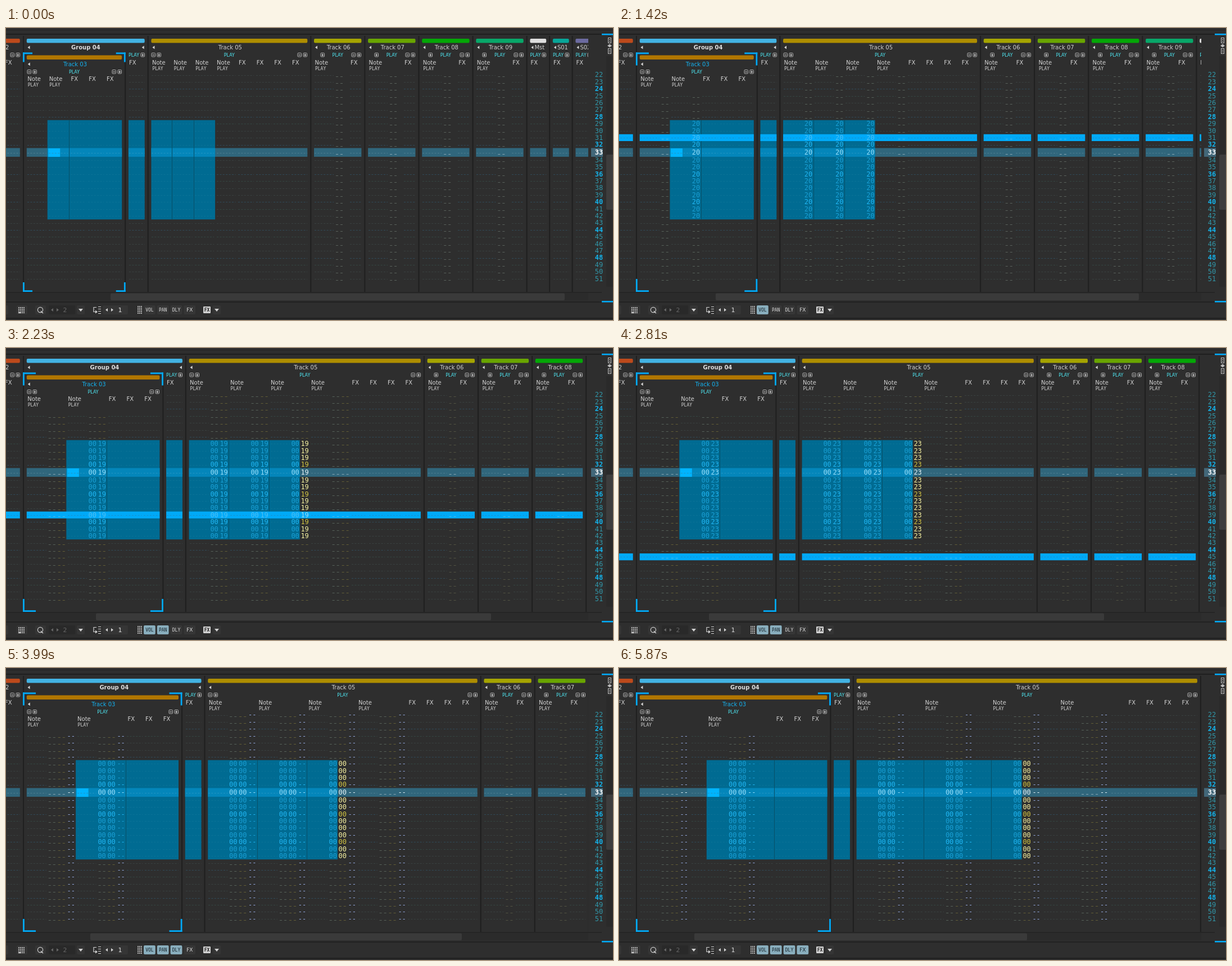
Write an HTML page with a canvas that moves like this. It is 1080x519 px and loops after 6.11 s.

```html
<!DOCTYPE html>
<html lang="en">
<head>
<meta charset="utf-8">
<title>Pattern editor</title>
<style>
html, body { margin: 0; width: 100%; height: 100%; overflow: hidden; background: #2e2e2e; }
canvas { display: block; width: 100vw; height: 100vh; }
</style>
</head>
<body>
<canvas id="stage" width="1080" height="519"></canvas>
<script>
const ctx = document.getElementById('stage').getContext('2d');
const LOOP = 6110, CLIP = 1036, FIRST = 22, LAST = 51, CURSOR = 33;
const SANS = '"DejaVu Sans", sans-serif', MONO = '"DejaVu Sans Mono", monospace';
const BG = '#2e2e2e', DARK = '#1f1f1f', LIGHT = '#d2d2d2', BLUE = '#00aaf8', CYAN = '#4ee6f2';
const NOTE_WIDTHS = [38.4, 55.2, 72, 88.8, 120.5];
const THUMBS = [[186, 994], [172, 925], [160, 863], [150, 811], [134, 726]];
const FX_WIDTH = 31.67, GAP = 11.7;
const SEL_TOP = 163.7, SEL_HEIGHT = 176.6, BAR_TOP = 213.4, BAR_HEIGHT = 15.5;
const SUB_OFFSETS = [45, 62, 79];
const SUB_COLORS = ['#566159', '#625d36', '#93a9de'];

function rect(x, y, w, h, color) {
  ctx.fillStyle = color;
  ctx.fillRect(x, y, w, h);
}
function rounded(x, y, w, h, color, r = 2) {
  ctx.fillStyle = color;
  ctx.beginPath();
  ctx.roundRect(x, y, w, h, r);
  ctx.fill();
}
function text(s, x, y, color = LIGHT, size = 10, family = SANS, align = 'left', weight = '') {
  ctx.font = `${weight} ${size}px ${family}`;
  ctx.textAlign = align;
  ctx.fillStyle = color;
  ctx.fillText(s, x, y + size * .365);
}
function triangle(x, y, dir, color = LIGHT) {
  const points = dir === 'down' ? [[-4, -2], [4, -2], [0, 3]]
    : dir === 'left' ? [[2, -3], [2, 3], [-2, 0]] : [[-2, -3], [-2, 3], [2, 0]];
  ctx.fillStyle = color;
  ctx.beginPath();
  for (const [dx, dy] of points) ctx.lineTo(x + dx, y + dy);
  ctx.fill();
}
function signBox(cx, cy, sign) {
  const x = Math.round(cx), y = Math.round(cy);
  ctx.strokeStyle = '#b4b4b4';
  ctx.lineWidth = 1;
  ctx.beginPath();
  ctx.roundRect(x - 3, y - 3.5, 6.5, 6.5, 1);
  ctx.stroke();
  rect(x - 1.5, y - .5, 3.5, 1, '#eee');
  if (sign === '+') rect(x - .3, y - 2, 1, 4, '#eee');
}
function signPair(x, y) { signBox(x, y, '-'); signBox(x + 10, y, '+'); }
function dashes(x1, x2, y, color) {
  const line = Math.floor(y + 1) + .5;
  ctx.strokeStyle = color;
  ctx.lineWidth = 1;
  ctx.setLineDash([3, 2.4]);
  ctx.beginPath();
  ctx.moveTo(Math.round(x1), line);
  ctx.lineTo(x2, line);
  ctx.stroke();
  ctx.setLineDash([]);
}
function emptyValue(cx, y, color) {
  const line = Math.floor(y + 3);
  rect(cx - 6, line, 4, 1, color);
  rect(cx + 2, line, 4, 1, color);
}

const rowY = r => r < CURSOR ? 83 + 12.4 * (r - FIRST) : r === CURSOR ? 221 : 234.5 + 12.4 * (r - 34);
const hex = v => v.toString(16).toUpperCase().padStart(2, '0');
const arch = (p, peak, power) => p <= 0 || p >= 1 ? 0 : Math.round(peak * Math.sin(Math.PI * p) ** power);

// The screen refreshes in steps of about 117 ms while the song plays.
function sceneAt(time) {
  const k = time < 480 ? -1 : Math.floor((time - 465) / 117.2);
  const mode = k < 0 ? 0 : k < 12 ? 1 : k < 24 ? 2 : k < 34 ? 3 : 4;
  const delay = arch((k - 24.5) / 5.5, 40, 1);
  return {
    mode,
    playRow: 25 + Math.floor((k - 3) * 20 / 17 + .25),
    values: [
      k < 2 ? '--' : hex(arch((k - 1.45) / 10, 41, 2)),
      k < 13 ? '--' : hex(arch((k - 12.66) / 11, 40.4, 1)),
      delay ? hex(delay) : '--'
    ]
  };
}

function layout(mode) {
  const w = NOTE_WIDTHS[mode];
  const multi = (notes, fx) => notes * w + fx * FX_WIDTH - 2.4;
  const specs = [
    ['multi', 'Track 03', '#b17600', multi(2, 3), 2, 3],
    ['slim', '', '', 28.8, 0, 1],
    ['multi', 'Track 05', '#ae8d00', multi(4, 4), 4, 4],
    ['single', 'Track 06', '#a5a400', 84.4, 1, 1],
    ['single', 'Track 07', '#69a500', 84.4, 1, 1],
    ['single', 'Track 08', '#04a706', 84.4, 1, 1],
    ['single', 'Track 09', '#08a769', 84.4, 1, 1],
    ['slim', 'Mst', '#dedede', 28.8, 0, 1],
    ['slim', 'S01', '#08a699', 28.8, 0, 1],
    ['slim', 'S02', '#6c6ba0', 28.8, 0, 1]
  ];
  let x = 36.8;
  return specs.map(([kind, title, color, width, notes, fx], i) => {
    const fxStart = kind === 'single' ? (mode ? 56 : 63) : notes * w;
    const track = { kind, title, color, x, width, notes, fx, w, fxStart, end: x + width, inner: i === 0 };
    x += width + GAP;
    return track;
  });
}

function drawHeader(t) {
  const dy = t.inner ? 29.7 : 0, mid = t.x + t.width / 2;
  if (t.color) {
    rounded(t.x, 18.9 + dy, t.width, 7.5, t.color);
    triangle(t.x + 4, 34.5 + dy, 'left');
    if (t.kind === 'slim') text(t.title, t.x + 8, 34.5);
    else text(t.title, mid + 1.5, 34.5 + dy, t.inner ? '#13b2f2' : LIGHT, 10, SANS, 'center');
  }
  const iconY = 48 + dy;
  if (t.kind === 'slim') {
    text('PLAY', t.x, iconY, CYAN, 8, SANS);
    signBox(t.x + 25, iconY, '+');
    text('FX', t.x + 1, 61);
    return;
  }
  text('PLAY', mid, iconY, CYAN, 8, SANS, 'center');
  if (t.kind === 'multi') signPair(t.x + 4, iconY);
  else signBox(t.x + 15, iconY, '+');
  signPair(t.end - 14, iconY);
  for (let n = 0; n < t.notes; n++) {
    text('Note', t.x + 1.5 + n * t.w, 61 + dy);
    text('PLAY', t.x + 2 + n * t.w, 71.7 + dy, LIGHT, 8, MONO);
  }
  for (let n = 0; n < t.fx; n++)
    text('FX', t.x + t.fxStart + 2 + n * FX_WIDTH, 61 + dy);
}

function selectionOf(i, t) {
  if (i === 0) return [t.x + t.w - 1.5, t.end];
  if (i === 1) return [t.x, t.end];
  if (i === 2) return [t.x, t.x + 2 * t.w + Math.min(t.w - 1.5, 53.2)];
}

function drawCells(t, i, scene) {
  const { mode, playRow, values } = scene;
  const sel = selectionOf(i, t);
  const top = t.inner ? 116 : 78;
  rect(t.x, BAR_TOP, t.width, BAR_HEIGHT, '#30667c');
  if (sel) {
    rect(sel[0], SEL_TOP, sel[1] - sel[0], SEL_HEIGHT, '#006b92');
    rect(sel[0], BAR_TOP, sel[1] - sel[0], BAR_HEIGHT, '#0486ba');
    for (let n = 1; n <= t.notes; n++) {
      const x = Math.round(t.x + n * t.w - 1.5);
      if (x > sel[0] + 2 && x < sel[1] - 2) rect(x, SEL_TOP, 1, SEL_HEIGHT, '#085068');
    }
  }
  if (playRow >= FIRST && playRow <= LAST) {
    const y = Math.max(top, rowY(playRow) - 5.8);
    rect(t.x, y, t.width, rowY(playRow) + 6.4 - y, BLUE);
  }
  if (t.inner) rect(t.x + t.w, 214, 21, 15, '#00b4ff');

  for (let r = t.inner ? 25 : FIRST; r <= LAST; r++) {
    const y = rowY(r), beat = r % 4 === 0, current = r === CURSOR, playing = r === playRow;
    const picked = r >= 29 && r <= 42;
    const dim = x => {
      const inside = picked && sel && x >= sel[0] && x < sel[1];
      if (playing) return '#1990cc';
      if (current) return inside ? '#2294c2' : '#4d7c8e';
      return inside ? '#0b7397' : beat ? '#304a58' : r % 4 === 1 ? '#344642' : '#394140';
    };
    for (let n = 0; n < t.notes; n++) {
      const x = t.x + n * t.w;
      dashes(x + 1, x + 35, y, dim(x + 5));
      if (t.kind === 'single') {
        emptyValue(x + 45, y, current ? '#86a5b1' : playing ? '#4cb8ec' : mode < 2 ? '#59615b' : '#525342');
        continue;
      }
      for (let s = 0; s < Math.min(mode, 3); s++) {
        const cx = x + SUB_OFFSETS[s];
        const inside = picked && sel && cx > sel[0] && cx < sel[1];
        const edited = picked && ((i === 0 && n === 1) || (i === 2 && n < 3));
        const value = edited ? values[s] : '--';
        let color = SUB_COLORS[s];
        if (inside) color = current ? '#98dffb' : playing ? '#4dbef3' : beat ? '#20b6f3' : '#199fd4';
        else if (current) color = s < 2 && value === '--' ? '#86a5b1' : '#e6f4f8';
        else if (playing) color = value === '--' ? '#4cb8ec' : '#a0daf3';
        else if (value !== '--') color = s === 1 ? (beat ? '#d0c344' : '#f4f0a0') : (beat ? '#8eaaf0' : '#c6d5ff');
        if (value === '--' && s < 2) emptyValue(cx, y, color);
        else text(value, cx, y, color, 12, MONO, 'center');
      }
      if (mode === 4) dashes(x + 92, x + 117, y, dim(x + 92));
    }
    for (let n = 0; n < t.fx; n++) {
      const x = t.x + t.fxStart + n * FX_WIDTH;
      dashes(x + 1, Math.min(x + 29, t.end), y, dim(x + 1));
    }
  }
}

function drawBrackets(end, length) {
  const left = 30, right = end + 6.5, top = 43.5, bottom = 469, thick = 2.8;
  for (const [x, sx] of [[left, 1], [right, -1]])
    for (const [y, sy] of [[top, 1], [bottom, -1]]) {
      rect(sx > 0 ? x : x - length, sy > 0 ? y : y - thick, length, thick, BLUE);
      rect(sx > 0 ? x : x - thick, sy > 0 ? y : y - length, thick, length, BLUE);
    }
}

function drawLeftTrack(scene) {
  drawCells({ kind: 'slim', x: -4, width: 28.8, end: 24.8, notes: 0, fx: 1, fxStart: 0, w: 0 }, -1, scene);
  rounded(-4, 18.9, 28.8, 7.5, '#bd4a1c');
  text('2', -1, 34.5);
  signPair(11, 48);
  text('FX', -2, 61);
}

function drawTracks(scene) {
  const tracks = layout(scene.mode);
  ctx.save();
  ctx.beginPath();
  ctx.rect(0, 13, CLIP, 457);
  ctx.clip();
  drawLeftTrack(scene);
  rect(30, 14, 2, 455, DARK);
  tracks.forEach((t, i) => {
    drawCells(t, i, scene);
    drawHeader(t);
    rect(t.end + 5, t.inner ? 44 : 14, 2, t.inner ? 425 : 455, DARK);
  });
  const groupEnd = tracks[1].end;
  rounded(36.8, 18.9, groupEnd - 36.8, 7.5, '#43b3e3');
  triangle(40.5, 34.5, 'left');
  triangle(groupEnd - 3, 34.5, 'left');
  text('Group 04', (37 + groupEnd) / 2, 34.5, '#dedede', 10, SANS, 'center', 'bold');
  drawBrackets(tracks[0].end, scene.mode ? 23 : 17);
  ctx.restore();
}

function drawRightEdge() {
  rect(1041, BAR_TOP, 21, BAR_HEIGHT, '#426779');
  for (let r = FIRST; r <= LAST; r++) {
    const current = r === CURSOR, beat = r % 4 === 0;
    const color = current ? '#fff' : beat ? '#14b2ea' : '#3196a8';
    text(r, 1055, rowY(r), color, 12, MONO, 'center', current || beat ? 'bold' : '');
  }
  rect(1068, 50, 12, 410, '#2a2a2a');
  rounded(1068, 225, 14, 98, '#3d3d3d');
  rect(1060, 10, 20, 2.6, BLUE);
  rect(1060, 485, 20, 2.6, BLUE);
  ctx.lineWidth = 1;
  for (const y of [22, 41]) {
    ctx.strokeStyle = '#c0c0c0';
    ctx.strokeRect(1071.5, y - 4.5, 5, 9);
    rect(1073, y - 2, 2, 1, '#ddd');
    rect(1073, y + 1, 2, 1, '#ddd');
  }
  triangle(1072, 31.5, 'left', '#bbb');
  triangle(1076, 31.5, 'right', '#bbb');
  rect(1072, 31, 4, 1, '#bbb');
}

function dots(x, y, columns, rows) {
  for (let c = 0; c < columns; c++)
    for (let r = 0; r < rows; r++) rect(x + c * 3, y + r * 3, 2, 2, '#b4b4b4');
}

function drawToolbar(mode) {
  rect(0, 469, 1060, 2, '#252525');
  rect(0, 471, CLIP, 13, '#2b2b2b');
  const [left, right] = THUMBS[mode];
  rounded(left, 471.5, right - left, 12.5, '#3a3a3a');
  rect(0, 486, 1060, 2, '#222');
  rect(0, 515, 1080, 2, '#1f1f1f');
  for (const [x, w] of [[-4, 8], [19, 19], [52, 19], [76, 47], [126, 14], [172, 45], [368, 14]])
    rounded(x, 493, w, 16, x === 76 ? '#292929' : '#353535');
  dots(22, 496, 4, 4);
  rect(22, 505, 5, 2, '#ddd');
  ctx.strokeStyle = '#d0d0d0';
  ctx.lineWidth = 1.2;
  ctx.beginPath();
  ctx.arc(61, 501, 4.6, 0, 7);
  ctx.moveTo(62, 503);
  ctx.lineTo(66, 507);
  ctx.stroke();
  triangle(82, 501, 'left', '#666');
  triangle(92, 501, 'right', '#666');
  text('2', 105, 501.3, '#666', 11, SANS, 'center');
  triangle(133, 501, 'down');
  ctx.beginPath();
  ctx.moveTo(161, 496.5);
  ctx.lineTo(156, 496.5);
  ctx.lineTo(156, 504.5);
  ctx.lineTo(160, 504.5);
  ctx.stroke();
  triangle(161, 504.5, 'right');
  for (let i = 0; i < 4; i++) rect(164, 495 + i * 4, 5, 1, '#d0d0d0');
  triangle(179, 501, 'left');
  triangle(189, 501, 'right');
  text('1', 203, 501.3, '#e0e0e0', 11, SANS, 'center');
  dots(234, 494, 3, 5);
  ['VOL', 'PAN', 'DLY', 'FX'].forEach((label, i) => {
    const on = mode > i, x = 245 + i * 23.8;
    rounded(x, 493, 20.8, 16, on ? '#89aebd' : '#363636');
    text(label, x + 10.4, 501.2, on ? '#142027' : '#dcdcdc', i === 3 ? 9 : 8, i === 3 ? SANS : MONO, 'center');
  });
  rounded(351, 495, 13, 12, '#d2d2d2', 1);
  text('FX', 357.5, 501, '#222', 8, MONO, 'center', 'bold');
  triangle(375, 501, 'down');
}

function draw(now) {
  const scene = sceneAt(now % LOOP);
  rect(0, 0, 1080, 519, BG);
  rect(0, 3, 1080, 1, '#222');
  rect(0, 10, 1060, 2, DARK);
  drawTracks(scene);
  drawRightEdge();
  drawToolbar(scene.mode);
}

const start = performance.now();
function tick() {
  draw(performance.now() - start);
  requestAnimationFrame(tick);
}
tick();
</script>
</body>
</html>
```
